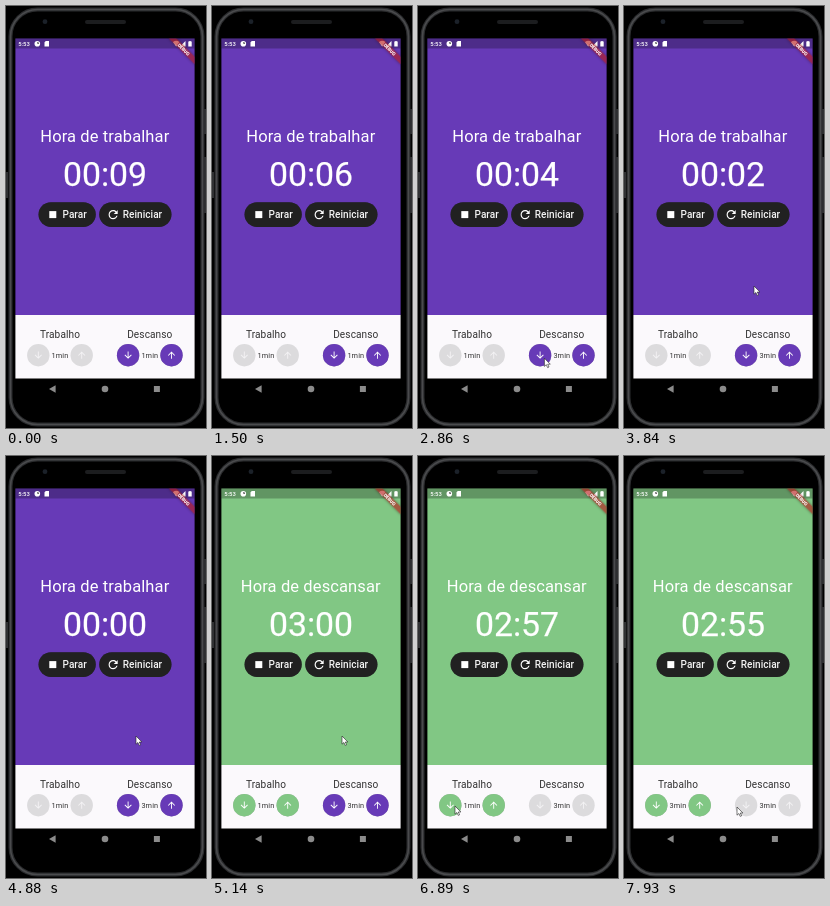
An HTML page that plays this animation: 200x422 px, repeating every 8000 ms.

```html
<!DOCTYPE html>
<html lang="pt">
<head>
<meta charset="utf-8">
<title>Temporizador</title>
<style>
html, body { margin: 0; width: 100%; height: 100%; overflow: hidden; background: #000; }
svg { display: block; width: 100%; height: 100%; font-family: Roboto, Arial, sans-serif; }
.mid { text-anchor: middle; }
.white { fill: #fff; }
.raised { filter: drop-shadow(0 .7px .7px rgba(0, 0, 0, .3)); }
.label { font-size: 10.08px; letter-spacing: .11px; fill: #333; }
.mins { font-size: 7.33px; letter-spacing: .11px; fill: #333; }
.action { font-size: 10px; font-weight: 500; letter-spacing: .04px; fill: #f4f4f4; }
</style>
</head>
<body>
<svg viewBox="0 0 200 422">
  <defs>
    <clipPath id="screen"><path d="M9.4 32.5h179.2v361H9.4z"/></clipPath>
    <path id="down" d="M20 12l-1.41-1.41L13 16.17V4h-2v12.17l-5.58-5.59L4 12l8 8 8-8z"/>
  </defs>

  <!-- phone body -->
  <path d="M198 103h2v25h-2zM198 151h2v56h-2zM0 166h2v26H0z" fill="#303133"/>
  <g fill="none">
    <rect x="4.5" y="3.5" width="192" height="415" rx="27" stroke="#2b2c2e" stroke-width="4"/>
    <rect x="4.5" y="3.5" width="192" height="415" rx="27" stroke="#4a4b4d" stroke-width="1.6"/>
  </g>
  <rect x="79" y="14" width="41" height="4" rx="2" fill="#1c1d1f"/>
  <circle cx="39" cy="15.7" r="2.4" fill="#1b2129"/>

  <g clip-path="url(#screen)">
    <path id="back" d="M9 32h180v277H9z"/>
    <path d="M9 309h180v63.6H9z" fill="#fbf9fc"/>
    <path d="M9 32h180v10.5H9z" opacity=".25"/>
  </g>

  <!-- status bar -->
  <g class="white">
    <text x="12.2" y="39.9" font-size="5.9" font-weight="500">5:53</text>
    <circle cx="31.3" cy="37.8" r="2.8"/>
    <path d="M38.5 36.3l1.3-1.3h3.2v5.6h-4.5z"/>
    <path d="M167 36q3.2-2.4 6.4 0l-3.2 4.5z"/>
    <path d="M179.5 35v5.5H174z"/>
    <path d="M182.3 35.6h1v-.7h1.4v.7h1v5h-3.4z"/>
  </g>
  <path d="M31.3 37.8v-1.8a1.8 1.8 0 0 1 1.8 1.8z" fill="#333"/>

  <!-- corner banner -->
  <g clip-path="url(#screen)">
    <g transform="translate(188.6 32.5) rotate(45)">
      <path d="M-18.3 12.8h36.6v5.5h-36.6z" fill="#b71c1c" opacity=".63" style="filter: drop-shadow(0 0 1.4px rgba(0, 0, 0, .5))"/>
      <text class="mid white" y="17.2" font-size="4.67" font-weight="900">DEBUG</text>
    </g>
  </g>

  <!-- timer -->
  <g class="mid white">
    <text id="title" x="98.8" y="136.4" font-size="16.5" letter-spacing=".11"></text>
    <text id="clock" x="99" y="180" font-size="33.8" stroke="#fff" stroke-width=".25"></text>
  </g>
  <g class="raised" fill="#212121">
    <rect x="32.5" y="196.2" width="57.3" height="24.8" rx="12.4"/>
    <rect x="93.2" y="196.2" width="72.3" height="24.8" rx="12.4"/>
  </g>
  <path class="white" d="M43.3 205.1h7v7h-7z"/>
  <path class="white" transform="translate(100.3 201.8) scale(.57)" d="M17.65 6.35C16.2 4.9 14.21 4 12 4c-4.42 0-7.99 3.58-7.99 8s3.57 8 7.99 8c3.73 0 6.84-2.55 7.73-6h-2.08c-.82 2.33-3.04 4-5.65 4-3.31 0-6-2.69-6-6s2.69-6 6-6c1.66 0 3.14.69 4.22 1.78L13 11h7V4l-2.35 2.35z"/>
  <text class="action" x="56.5" y="212.2">Parar</text>
  <text class="action" x="116.8" y="212.2">Reiniciar</text>

  <g id="panel"></g>

  <!-- navigation bar -->
  <g fill="#8b8b8b">
    <path d="M43 383l6.6-3.8v7.6z"/>
    <circle cx="99" cy="383" r="3.3"/>
    <path d="M147.9 380h6v6h-6z"/>
  </g>

  <path id="cursor" d="M0 0v8.2l1.9-1.7 1.3 2.9 1.4-.6-1.3-2.8h2.6z" fill="#fff" stroke="#222" stroke-width=".6"/>
</svg>
<script>
const LOOP = 8000, TICK = 520, SWITCH = 5140;
const PURPLE = '#673ab7', GREEN = '#81c784', GREY = '#dcdbdd';
const $ = id => document.getElementById(id);

// One setting: label, minutes and a pair of round arrow buttons
function addSetting(id, label, x) {
  const button = (dx, turn) => `
    <g transform="translate(${x + dx} 349.2)">
      <circle class="${id}Disc" r="11.2"/>
      <use class="${id}Icon" href="#down" transform="rotate(${turn}) scale(.45) translate(-12 -12)"/>
    </g>`;
  $('panel').innerHTML += `
    <text class="label mid" x="${x}" y="331.7">${label}</text>
    <text class="mins mid" x="${x}" y="352" id="${id}Mins"></text>
    ${button(-21.7, 0)}${button(21.7, 180)}`;
}
addSetting('work', 'Trabalho', 54);
addSetting('rest', 'Descanso', 143.8);

function showSetting(id, minutes, enabled, color) {
  $(id + 'Mins').textContent = minutes + 'min';
  document.querySelectorAll(`.${id}Disc`).forEach(disc => {
    disc.setAttribute('fill', enabled ? color : GREY);
    disc.classList.toggle('raised', enabled);
  });
  document.querySelectorAll(`.${id}Icon`).forEach(icon =>
    icon.setAttribute('fill', enabled ? '#fff' : '#f3f2f4'));
}

// [time, value] steps
const restSteps = [[0, 1], [2020, 2], [2150, 3], [2280, 4], [2800, 3]];
const workSteps = [[0, 1], [7350, 2], [7480, 3]];
const valueAt = (steps, t) => steps.filter(s => s[0] <= t).pop()[1];

// [time, x, y] of the pointer tip
const pointer = [
  [1560, 198, 362], [1820, 168, 350], [2540, 168, 350], [2800, 126.4, 352.2],
  [3000, 126.4, 352.2], [3320, 186, 335], [3780, 130, 280], [5660, 130, 280],
  [6100, 76, 346], [6440, 37, 350], [6950, 37, 350], [7220, 76, 351],
  [7540, 76, 351], [7900, 113, 351], [8000, 113, 351]
];

function movePointer(t) {
  const i = pointer.findIndex(p => p[0] > t);
  $('cursor').style.display = i > 0 ? '' : 'none';
  if (i < 1) return;
  const [t0, x0, y0] = pointer[i - 1], [t1, x1, y1] = pointer[i];
  const u = (t - t0) / (t1 - t0), k = u * u * (3 - 2 * u);
  $('cursor').setAttribute('transform', `translate(${x0 + (x1 - x0) * k} ${y0 + (y1 - y0) * k})`);
}

function draw(t) {
  const resting = t >= SWITCH;
  const ticks = Math.floor((t - SWITCH) / TICK);
  const left = resting ? 180 - ticks : -1 - ticks;
  const pad = n => String(n).padStart(2, '0');
  $('clock').textContent = pad(Math.floor(left / 60)) + ':' + pad(left % 60);
  $('title').textContent = resting ? 'Hora de descansar' : 'Hora de trabalhar';
  $('back').setAttribute('fill', resting ? GREEN : PURPLE);
  showSetting('work', valueAt(workSteps, t), resting, GREEN);
  // Disabled colour arrives only after the button has sunk
  showSetting('rest', valueAt(restSteps, t), t < SWITCH + 120, PURPLE);
  movePointer(t);
}

const start = performance.now();
function frame() {
  draw((performance.now() - start) % LOOP);
  requestAnimationFrame(frame);
}
frame();
</script>
</body>
</html>
```
